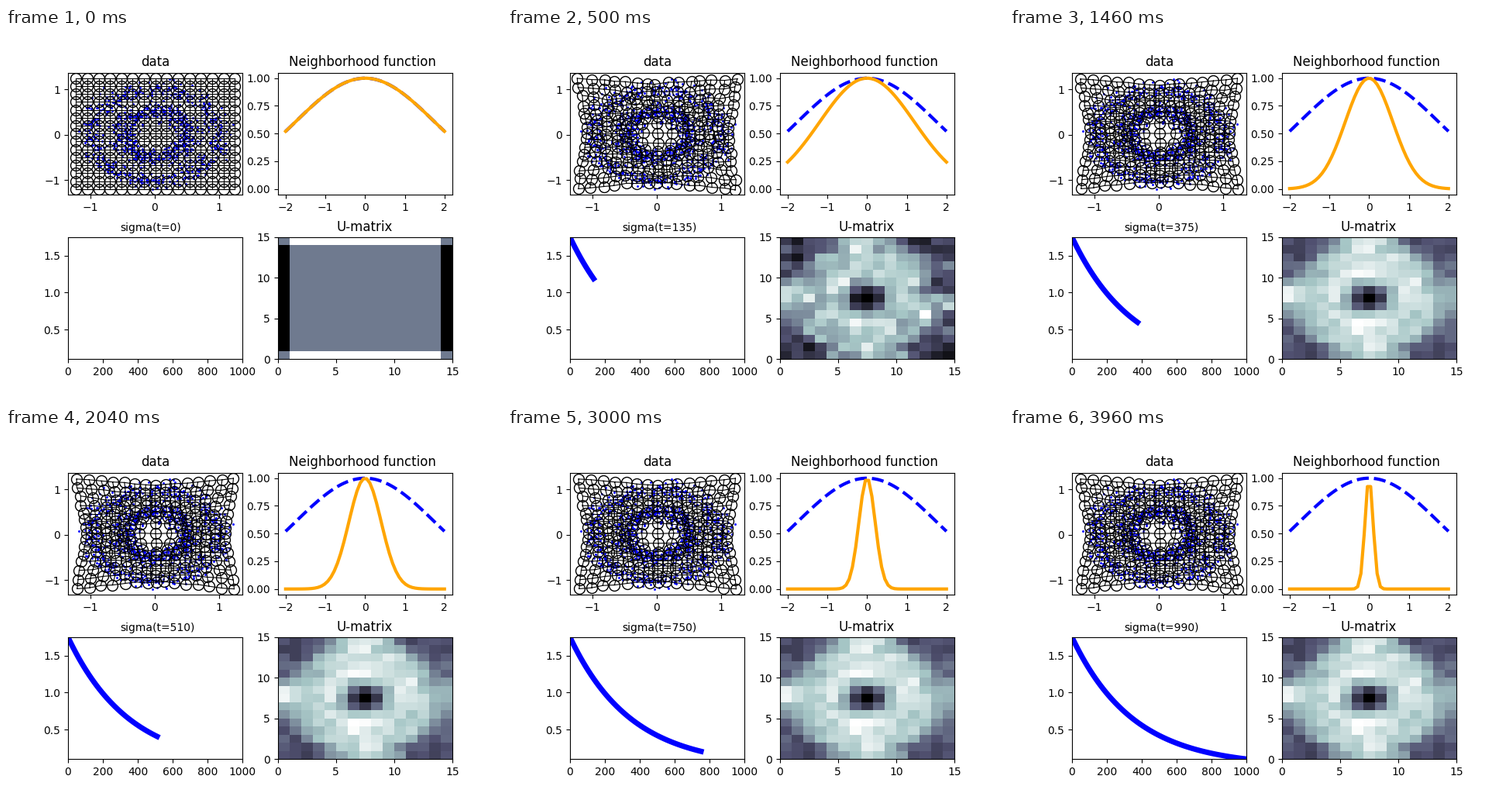
Write a matplotlib script that moves like this. It is 640x480 px and loops after 4060 ms.

```python
import numpy as np
import matplotlib.pyplot as plt
from matplotlib.animation import FuncAnimation

N, STEPS, STRIDE = 15, 67, 15
INTERVAL, TICKS = 20, 203
LOW = np.array([-1.22, -1.20])
HIGH = np.array([1.24, 1.245])
SIGMA_START, SIGMA_END, T_MAX = 1.75, 0.1, 1000

rng = np.random.default_rng(4)


def sigma(t):
    return SIGMA_START * (SIGMA_END / SIGMA_START) ** (t / T_MAX)


def ring(radius, count, noise=0.1):
    a = np.linspace(0, 2 * np.pi, count, endpoint=False)
    pts = radius * np.array([np.cos(a), np.sin(a)])
    return pts + rng.normal(0, noise, pts.shape)


# Lattice in cell units, centred on the middle neuron.
cell = (HIGH - LOW) / (N - 1)
axis = np.arange(N) - N // 2
lattice = np.array(np.meshgrid(axis, axis), dtype=float)


def to_data(cells):
    return (LOW + HIGH)[:, None, None] / 2 + cells * cell[:, None, None]


def pull(x, y, strength, width):
    """Draw neurons towards (x, y); a negative strength pushes them away."""
    gap = np.array([x, y])[:, None, None] - lattice
    fall = np.exp(-(gap ** 2).sum(axis=0) / (2 * width ** 2))
    return strength * fall * gap * cell[:, None, None]


def settled():
    """Trained map: sparse in the middle, crowded on the inner ring."""
    r = np.hypot(*lattice)
    reach = np.interp(r, [0, 1, 2, 3, 4, 5, 6, 7, 9.9],
                      [0, 0.235, 0.39, 0.49, 0.60, 0.745, 0.90, 1.07, 1.73])
    unit = lattice / np.maximum(r, 1)
    centre = (LOW + HIGH)[:, None, None] / 2
    return (centre + unit * reach + pull(0.3, -7, 0.3, 1.2)
            + pull(7, 0, 0.1, 3) + pull(-7, 0, 0.1, 3))


data = np.hstack([ring(1, 500), ring(0.5, 500)])
data = np.clip(data, LOW[:, None], HIGH[:, None])

start, goal = to_data(lattice), settled()
early = rng.normal(0, 0.025, start.shape) + pull(1.5, 6, -0.35, 1.4)
walk = rng.normal(0, 0.0055, (STEPS,) + start.shape)
walk *= np.exp(-np.arange(STEPS) / 8)[:, None, None, None]
walk[0] = 0
walk = walk.cumsum(axis=0)


def neurons(step):
    p = 1 - np.exp(-step * STRIDE / 70)
    return start + p * (goal - start) + 4 * p * (1 - p) * early + walk[step]


def u_matrix(pos):
    """Mean distance to the direct neighbours, with x along the rows."""
    total, count = np.zeros((N, N)), np.zeros((N, N))
    across = np.hypot(*np.diff(pos, axis=2))
    along = np.hypot(*np.diff(pos, axis=1))
    for part, dist in (((slice(None), slice(1, None)), across),
                       ((slice(None), slice(None, -1)), across),
                       ((slice(1, None), slice(None)), along),
                       ((slice(None, -1), slice(None)), along)):
        total[part] += dist
        count[part] += 1
    return (total / count).T


def mesh_lines(pos):
    """All rows and columns as one path, broken by NaN."""
    gap = np.full((2, N, 1), np.nan)
    rows = np.concatenate([pos, gap], axis=2).reshape(2, -1)
    cols = np.concatenate([pos.transpose(0, 2, 1), gap], axis=2).reshape(2, -1)
    return np.hstack([rows, cols])


def neighborhood(t):
    return np.exp(-xs ** 2 / (2 * sigma(t) ** 2))


fig, ((ax_map, ax_hood), (ax_sigma, ax_u)) = plt.subplots(
    2, 2, figsize=(6.4, 4.8), dpi=100)
fig.subplots_adjust(left=0.125, right=0.9, bottom=0.11, top=0.88,
                    wspace=0.2, hspace=0.35)

margin = 0.05 * (HIGH - LOW)
ax_map.set_title("data")
ax_map.set_xlim(LOW[0] - margin[0], HIGH[0] + margin[0])
ax_map.set_ylim(LOW[1] - margin[1], HIGH[1] + margin[1])
ax_map.set_xticks([-1, 0, 1])
ax_map.set_yticks([-1, 0, 1])
ax_map.plot(*data, "o", color="b", ms=2.1, mew=0)
mesh, = ax_map.plot([], [], "k-", lw=0.8)
nodes, = ax_map.plot([], [], "o", ms=10, mfc="none", mec="k", mew=1)

xs = np.linspace(-2, 2, 50)
ax_hood.set_title("Neighborhood function", x=0.487)
ax_hood.set_xlim(-2.2, 2.2)
ax_hood.set_ylim(-0.05, 1.05)
ax_hood.set_xticks(range(-2, 3))
ax_hood.plot(xs, neighborhood(0), "b--", lw=3)
hood, = ax_hood.plot(xs, neighborhood(0), color="orange", lw=3)

ax_sigma.set_xlim(0, T_MAX)
ax_sigma.set_ylim(SIGMA_END, SIGMA_START)
ax_sigma.set_yticks([0.5, 1.0, 1.5])
curve, = ax_sigma.plot([], [], "b-", lw=5)
label = ax_sigma.text(0.3, 1.05, "", transform=ax_sigma.transAxes)

ax_u.set_title("U-matrix", x=0.496)
heat = ax_u.pcolormesh(u_matrix(start), cmap="bone_r")
ax_u.set_xticks(range(0, N + 1, 5))
ax_u.set_yticks(range(0, N + 1, 5))


def update(i):
    # Steps alternate between one tick and five ticks on screen.
    cycle, tick = divmod(i, 6)
    step = min(2 * cycle + (tick > 0), STEPS - 1)
    t = step * STRIDE
    pos = neurons(step)
    nodes.set_data(*pos.reshape(2, -1))
    mesh.set_data(*mesh_lines(pos))
    hood.set_ydata(neighborhood(t))
    ts = np.arange(0, t + 1, STRIDE)
    curve.set_data(ts, sigma(ts))
    label.set_text(f"sigma(t={t})")
    u = u_matrix(pos)
    heat.set_array(u)
    heat.set_clim(u.min(), u.max())
    return nodes, mesh, hood, curve, label, heat


anim = FuncAnimation(fig, update, frames=TICKS, interval=INTERVAL,
                     repeat=True, repeat_delay=0)
plt.show()
```
